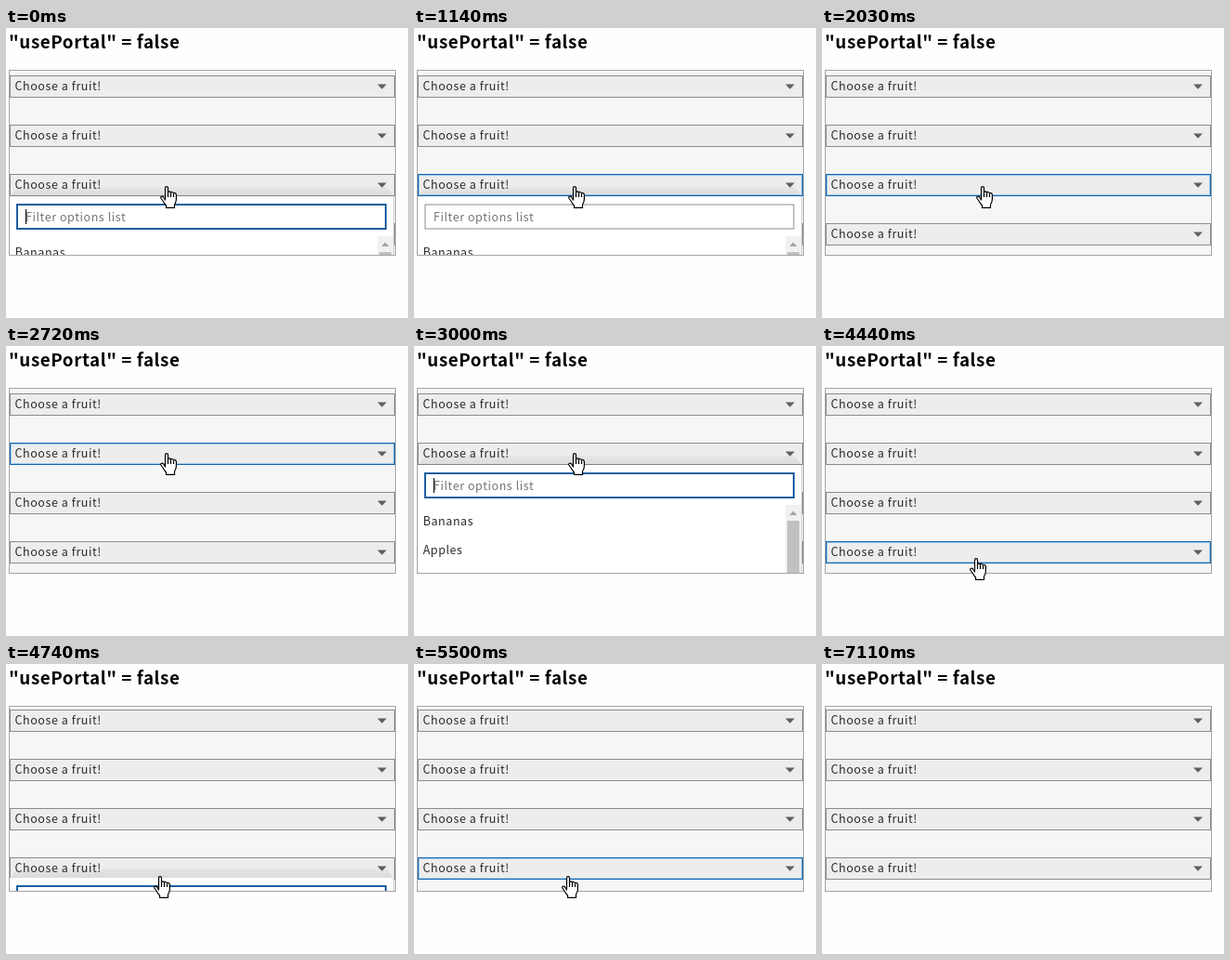
Write an HTML page that moves like this. It is 433 px wide and 312 px high and loops after 7210 ms.

```html
<!DOCTYPE html>
<html lang="en">
<head>
<meta charset="utf-8">
<title>Dropdown demo</title>
<style>
  html, body { margin: 0; width: 100%; height: 100%; overflow: hidden; background: #fefefe; }
  svg { display: block; width: 433px; height: 312px; }
  text {
    font: 12.5px "Noto Sans CJK JP", "Noto Sans CJK SC", "Noto Sans CJK KR", "Noto Sans CJK", "Noto Sans", sans-serif;
    letter-spacing: .57px;
    fill: #2b2b2b;
  }
  .title { font-size: 18.8px; font-weight: 700; fill: #000; }
  .hint { fill: #757575; }
  .box { fill: #ededed; stroke: #8c8c8c; }
  .ring { fill: none; visibility: hidden; }
  .focused .box { stroke: #1565ad; }
  .focused .ring { visibility: visible; stroke: #9cc8ec; }
  .field { fill: #fff; stroke: #8c8c8c; }
  .typing .field { stroke: #1d5f9f; stroke-width: 2; }
  .cursor path { fill: #fff; stroke: #000; stroke-width: 1.2; stroke-linejoin: round; }
</style>
</head>
<body>
<svg viewBox="0 0 433 312">
  <defs>
    <clipPath id="view"><rect x="4" y="46" width="415" height="198"/></clipPath>
    <linearGradient id="shade" x2="0" y2="1">
      <stop offset="0" stop-opacity=".03"/>
      <stop offset="1" stop-opacity=".075"/>
    </linearGradient>
    <g id="select">
      <rect class="box" x="4.5" y=".5" width="414" height="23"/>
      <rect class="ring" x="5.5" y="1.5" width="412" height="21"/>
      <text x="9.5" y="16">Choose a fruit!</text>
      <path d="M400 9.5h10l-5 5.3z" fill="#606060"/>
    </g>
  </defs>

  <text class="title" x="3" y="22">"usePortal" = false</text>
  <rect x="3.5" y="45.5" width="416" height="199" fill="#f6f6f6" stroke="#a3a3a3"/>

  <g clip-path="url(#view)">
    <g id="selects"></g>
    <g id="panel">
      <path d="M5 0L12 -10H410L417 0z" fill="url(#shade)"/>
      <rect x="417" width="1" height="120" fill="#d4d4d4"/>
      <rect x="4" width="413" height="120" fill="#fff"/>
      <rect id="field" class="field" x="12" y="9" width="397" height="26"/>
      <text class="hint" x="21" y="27">Filter options list</text>
      <rect id="caret" x="21" y="14" width="1" height="16"/>
      <text x="9.7" y="65">Bananas</text>
      <text x="9.7" y="96">Apples</text>
      <rect x="400" y="43" width="17" height="80" fill="#f1f1f1"/>
      <path d="M404.5 54h8l-4-4.5z" fill="#a3a3a3"/>
      <rect x="402" y="60" width="13" height="70" fill="#c1c1c1"/>
    </g>
  </g>

  <g id="hand" class="cursor">
    <path d="M5.5 15V2.2Q5.5 .6 7 .6T8.5 2.2V7Q8.7 5.8 10 5.9T11.5 7.4Q11.8 6.3 13 6.5T14.5 8.2Q15 7.2 16.2 7.6T17.4 9.5V14Q17.4 17 15.5 20V23.4H6.5V21Q4.5 18.8 3 16L.8 13Q.3 11.6 1.6 11.2T3.8 12.3Z"/>
    <path d="M8.5 7V12M11.5 7.5V12M14.5 8.5V12"/>
  </g>
  <g id="arrow" class="cursor">
    <path d="M.5 .5V16.5L4.2 13L6.6 18.6L9 17.6L6.6 12.2H11.5Z"/>
  </g>
</svg>
<script>
const LOOP = 7210, FIRST_ROW = 51, ROW_STEP = 53;
const $ = id => document.getElementById(id);

$('selects').innerHTML = '<g></g>'.repeat(4);
const selects = [...$('selects').children];
selects.forEach(g => {
  for (const part of $('select').children) g.append(part.cloneNode(true));
});

// focus: index of the focused select; panel: top of the open list, or null
const steps = [
  { at: 0, scroll: 0, focus: -1, panel: 181, typing: true, caret: true, pointer: 'hand', x: 166, y: 170 },
  { at: 270, caret: false },
  { at: 840, caret: true },
  { at: 1140, focus: 2, typing: false, caret: false },
  { at: 2030, panel: null },
  { at: 2310, y: 166 },
  { at: 2460, y: 140 },
  { at: 2590, y: 115 },
  { at: 2720, focus: 1 },
  { at: 3000, focus: -1, panel: 128, typing: true, caret: true },
  { at: 3450, focus: 1, typing: false, caret: false },
  { at: 3880, panel: null },
  { at: 4010, x: 164, y: 150 },
  { at: 4140, x: 161, y: 202 },
  { at: 4290, x: 160, y: 223 },
  { at: 4440, focus: 3, x: 159, y: 228 },
  { at: 4740, focus: -1, scroll: 2, panel: 230, typing: true },
  { at: 5190, focus: 3, typing: false },
  { at: 5500, panel: null },
  { at: 6090, pointer: 'arrow', x: 196, y: 240 },
  { at: 6250, pointer: null },
  { at: 7110, focus: -1 }
];

const show = (el, on) => el.setAttribute('visibility', on ? 'visible' : 'hidden');
const move = (el, x, y) => el.setAttribute('transform', `translate(${x} ${y})`);

function draw(time) {
  const s = Object.assign({}, ...steps.filter(step => step.at <= time));
  selects.forEach((g, i) => {
    move(g, 0, FIRST_ROW + i * ROW_STEP - s.scroll);
    g.classList.toggle('focused', i === s.focus);
  });
  const open = s.panel !== null;
  show($('panel'), open);
  show($('caret'), open && s.caret);
  $('panel').classList.toggle('typing', s.typing);
  if (open) move($('panel'), 0, s.panel);
  for (const id of ['hand', 'arrow']) {
    show($(id), s.pointer === id);
    move($(id), s.x, s.y);
  }
}

const start = performance.now();
function tick() {
  draw((performance.now() - start) % LOOP);
  requestAnimationFrame(tick);
}
tick();
</script>
</body>
</html>
```
